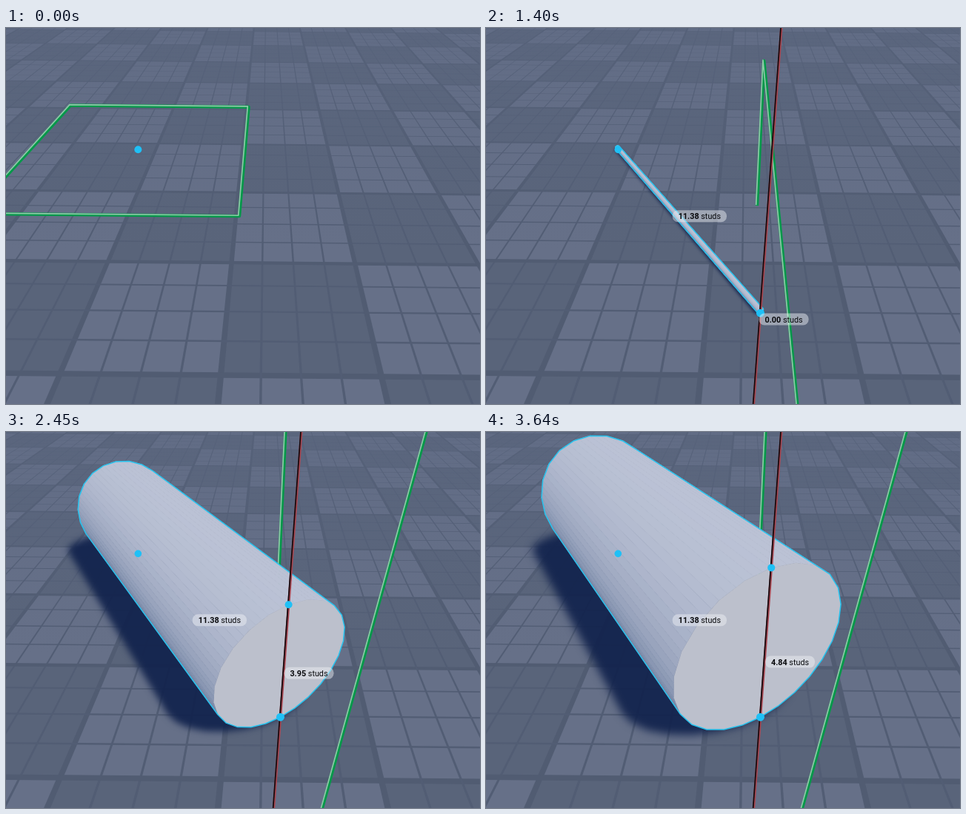
These frames come from a looping animation (640 by 508 pixels, 3920 ms). An HTML page with a canvas:

```html
<!DOCTYPE html>
<html>
<head>
<meta charset="utf-8">
<style>
html, body { margin: 0; width: 100%; height: 100%; overflow: hidden; background: #5a657c; }
canvas { display: block; }
</style>
</head>
<body>
<canvas id="stage" width="640" height="508"></canvas>
<script>
const ctx = document.getElementById('stage').getContext('2d');
const LOOP = 3920, STEP = 70, LAST = 3640, EXTRUDE = 1400;
const STUDS = 4, FLOOR_HALF = 1.235, WALL_HALF = 1.293;
const START = [-1.204, 2.85], END = [0.383, 0.49];

// time, then floor position (in tiles) of the dragged point
const DRAG = [[0, ...START], [490, .097, .981], [560, .204, .827], [700, .30, .66],
  [980, .364, .546], [1050, .364, .546], [1330, ...END]];
// time, then diameter in studs
const GROW = [[EXTRUDE, 0], [1540, .12], [1750, .76], [2100, 2.96], [2240, 3.5],
  [2450, 3.95], [2800, 4.24], [3150, 4.65], [3360, 4.8], [LAST, 4.84]];

const lerp = (a, b, f) => a.map((x, n) => x + (b[n] - x) * f);
const cross = (a, b, c) => (b[0] - a[0]) * (c[1] - b[1]) - (b[1] - a[1]) * (c[0] - b[0]);

function track(keys, t) {
  const i = keys.findIndex(k => k[0] > t);
  if (i < 0) return keys[keys.length - 1].slice(1);
  if (i === 0) return keys[0].slice(1);
  const a = keys[i - 1], b = keys[i];
  return lerp(a, b, (t - a[0]) / (b[0] - a[0])).slice(1);
}

// Camera: u across, v away, h up, all in tiles.
function project(u, v, h = 0) {
  const w = 1 + .301 * v, k = .296 * h;
  return [(352.7 * w - 62.7 + 217 * u - 338 * k) / (w - k),
          (-188 * w + 657 + 2 * u - 830 * k) / (w - k)];
}

function trace(points, close) {
  ctx.beginPath();
  points.forEach(p => ctx.lineTo(...p));
  if (close) ctx.closePath();
}
function fill(points, color) {
  trace(points, true);
  ctx.fillStyle = color;
  ctx.fill();
}
function stroke(points, color, width, close) {
  trace(points, close);
  ctx.strokeStyle = color;
  ctx.lineWidth = width;
  ctx.stroke();
}
function floorRect(u0, v0, u1, v1, color) {
  fill([project(u0, v0), project(u1, v0), project(u1, v1), project(u0, v1)], color);
}

function hull(points) {
  const sorted = [...points].sort((a, b) => a[0] - b[0] || a[1] - b[1]);
  const chain = list => {
    const out = [];
    for (const p of list) {
      while (out.length > 1 && cross(out[out.length - 2], out[out.length - 1], p) <= 0) out.pop();
      out.push(p);
    }
    return out.slice(0, -1);
  };
  return [...chain(sorted), ...chain(sorted.reverse())];
}

function drawFloor() {
  ctx.fillStyle = '#59647a';
  ctx.fillRect(0, 0, 640, 508);
  for (let i = -8; i < 8; i++)
    for (let j = -1; j < 10; j++)
      if ((i + j) & 1) floorRect(i, j, i + 1, j + 1, '#667088');
  for (let n = -32; n <= 40; n++) {
    const thick = n % 4 === 0, half = thick ? .019 : .0075, p = n / 4;
    const color = thick ? '#515c72' : '#525d74';
    if (p <= 8) floorRect(p - half, -1, p + half, 10, color);
    if (p >= -1) floorRect(-8, p - half, 8, p + half, color);
  }
  const haze = ctx.createLinearGradient(0, 0, 0, 300);
  haze.addColorStop(0, 'rgba(92,104,130,.45)');
  haze.addColorStop(1, 'rgba(92,104,130,0)');
  ctx.fillStyle = haze;
  ctx.fillRect(0, 0, 640, 300);
}

function drawGuide(points, close) {
  stroke(points, '#06984a', 4.4, close);
  stroke(points.map(([x, y]) => [x - 1.3, y - .9]), '#8fc9a8', 1.7, close);
}

function drawCylinder(a, b, size, shadow) {
  const r = size / 2, sides = 24, strips = 3;
  const len = Math.hypot(b[0] - a[0], b[1] - a[1]) || 1;
  const across = [(a[1] - b[1]) / len, (b[0] - a[0]) / len];
  const ring = c => Array.from({ length: sides }, (_, i) => {
    const angle = i / sides * 2 * Math.PI, s = r * Math.sin(angle);
    return [c[0] + across[0] * s, c[1] + across[1] * s, r * (1 - Math.cos(angle))];
  });
  const farRing = ring(a), nearRing = ring(b);
  const far = farRing.map(p => project(...p)), near = nearRing.map(p => project(...p));

  if (shadow) {
    const cast = [...farRing, ...nearRing].map(([u, v, h]) => project(u - .66 * h, v + .45 * h));
    ctx.filter = `blur(${2 + 3 * size}px)`;
    fill(hull(cast), 'rgba(18,35,77,.93)');
    ctx.filter = 'none';
  }
  for (let i = 0; i < sides; i++) {
    const j = (i + 1) % sides;
    if (cross(near[i], near[j], far[j]) <= 0) continue;
    for (let s = 0; s < strips; s++) {
      const f0 = s / strips, f1 = (s + 1) / strips;
      const angle = (i + (f0 + f1) / 2) / sides * 2 * Math.PI;
      const dark = (.5 - .5 * Math.cos(angle - 2.6)) ** 2;
      const color = `rgb(${lerp([187, 194, 213], [98, 116, 150], dark).map(Math.round)})`;
      const strip = [lerp(near[i], near[j], f0), lerp(near[i], near[j], f1),
                     lerp(far[i], far[j], f1), lerp(far[i], far[j], f0)];
      fill(strip, color);
      stroke(strip, color, .8, true);
    }
  }
  fill(near, '#bcc0cc');
  stroke(hull([...far, ...near]), '#27c3ee', 1.5, true);
}

function drawDot([x, y], r) {
  ctx.beginPath();
  ctx.arc(x, y, r, 0, 7);
  ctx.fillStyle = '#1fc0f6';
  ctx.fill();
}

function drawLabel(x, y, value) {
  const bold = 'bold 10.8px Roboto, sans-serif', plain = '10.8px Roboto, sans-serif';
  const number = value.toFixed(2), unit = ' studs';
  ctx.font = bold;
  const split = ctx.measureText(number).width;
  ctx.font = plain;
  const width = split + ctx.measureText(unit).width + 16;
  ctx.beginPath();
  ctx.roundRect(x, y - 8, width, 16, 7.5);
  ctx.fillStyle = 'rgba(238,240,245,.47)';
  ctx.fill();
  ctx.fillStyle = '#08090c';
  ctx.fillText(unit, x + 8 + split, y + 4);
  ctx.font = bold;
  ctx.fillText(number, x + 8, y + 4);
}

function drawLengthLabel(tip) {
  const du = tip[0] - START[0], dv = tip[1] - START[1];
  const [x, y] = project(START[0] + du / 2, START[1] + dv / 2);
  drawLabel(x, y + 5.6, STUDS * Math.hypot(du, dv));
}

function drawDrag(t) {
  const tip = track(DRAG, t), [u, v] = tip, d = FLOOR_HALF;
  drawGuide([project(u - d, v + d), project(u + d, v + d),
             project(u + d, v - d), project(u - d, v - d)], true);
  const from = project(...START), to = project(...tip);
  if (t > 0) {
    drawCylinder(START, tip, .05);
    stroke([from, to], '#05070b', 3.6);
  }
  drawDot(from, 5);
  if (t > 0) {
    drawDot(to, 6);
    drawLengthLabel(track(DRAG, t - STEP));
  }
}

function drawExtrude(t) {
  const [diameter] = track(GROW, t), h = diameter / STUDS, [u, v] = END;
  const back = v + WALL_HALF, front = v - WALL_HALF, top = h + WALL_HALF;
  drawGuide([project(u, back), project(u, back, top),
             project(u, front, top), project(u, front)]);
  drawCylinder(START, END, Math.max(h, .05), true);

  const foot = project(u, v), head = project(u, v, h);
  const axisX = y => foot[0] - (y - foot[1]) * .0735;
  const axis = [[axisX(0), 0], [axisX(508), 508]];
  stroke(axis, '#a8454f', 3.4);
  stroke(axis.map(([x, y]) => [x - .8, y]), '#12090d', 1.7);

  drawDot(project(...START), 4.8);
  drawDot(foot, 5.5);
  drawDot(head, 5);
  drawLengthLabel(END);
  drawLabel(368.5 + 7 * h, 393.5 - 68.5 * h, diameter);
}

function frame() {
  const now = performance.now() % LOOP;
  const t = Math.min(LAST, Math.floor(now / STEP) * STEP);
  drawFloor();
  ctx.lineJoin = 'round';
  (t < EXTRUDE ? drawDrag : drawExtrude)(t);
  requestAnimationFrame(frame);
}
frame();
</script>
</body>
</html>
```
